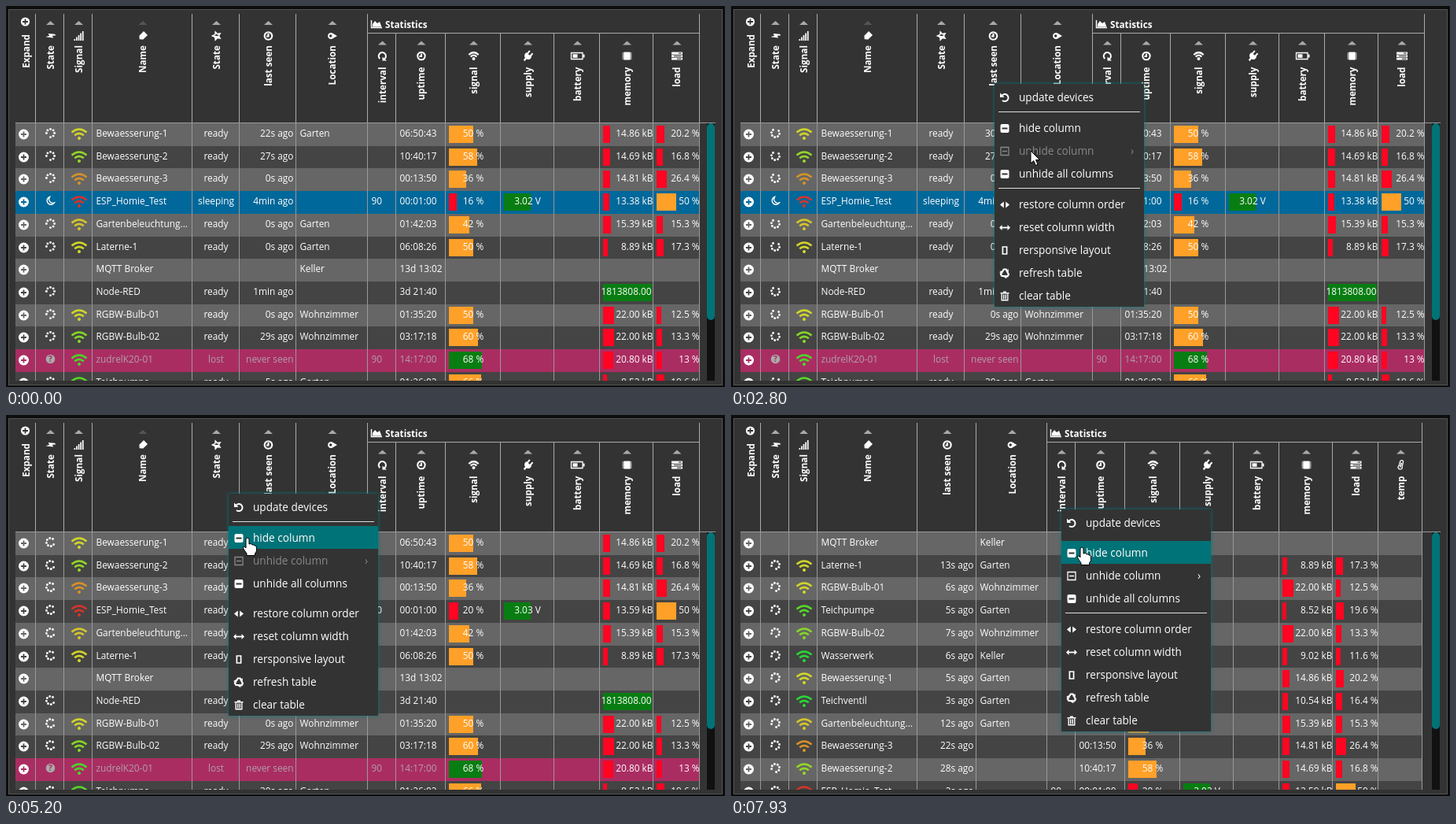
These frames come from a looping animation (914x484 px, 8000 ms). An HTML page:

```html
<!DOCTYPE html>
<html lang="de">
<head>
<meta charset="utf-8">
<title>Device table</title>
<style>
html, body { margin: 0; width: 100%; height: 100%; overflow: hidden; background: #0d0d0d; }
svg { display: block; width: 914px; height: 484px; font: 500 11.85px "Open Sans", "Noto Sans", sans-serif; fill: #fff; }
.head { font-size: 11.7px; font-weight: 700; }
.menu { font-size: 13.6px; font-weight: 400; }
.line { fill: none; stroke: currentColor; color: #fff; }
.glow { filter: drop-shadow(0 0 2px #00777c); }
</style>
</head>
<body>
<svg viewBox="0 0 914 484">
  <defs><clipPath id="body"><rect x="12" y="148" width="871" height="328"/></clipPath></defs>
  <rect x="3.5" y="4.5" width="907" height="477" fill="#333" stroke="#555"/>
  <g id="table"></g>
  <rect x="891" y="149" width="10" height="327" fill="#111"/>
  <rect x="891" y="149" width="10" height="250" rx="5" fill="#007377"/>
  <g id="menu"></g>
  <g id="cursor" stroke="#000" stroke-width="1"></g>
</svg>
<script>
const LOOP = 8000, STEP = 200 / 3;
const TOP = 149, ROW = 28.7;
const UPDATE = 470, WAKE = 3070, HIDE = 5330, REFRESH = 6500;
const $ = id => document.getElementById(id);

// Drawing helpers
const rect = (x, y, w, h, fill, more = '') =>
  `<rect x="${x}" y="${y}" width="${w}" height="${h}" fill="${fill}" ${more}/>`;
const text = (x, y, s, more = '') => `<text x="${x}" y="${y}" ${more}>${s}</text>`;
const solid = d => `<path d="${d}"/>`;
const line = (d, w = 1.5) => `<path class="line" stroke-width="${w}" d="${d}"/>`;
const disc = (x, y, r) => `<circle cx="${x}" cy="${y}" r="${r}"/>`;
const place = (x, y, s) => `<g transform="translate(${x} ${y})">${s}</g>`;
const turn = (deg, s) => `<g transform="rotate(${deg})">${s}</g>`;
const anchor = a => `text-anchor="${a}"`;

const plus = (r, bg) => disc(0, 0, r) +
  `<path d="M-3.5 0H3.5M0-3.5V3.5" stroke="${bg}" stroke-width="1.8"/>`;
const clock = line('M0-4.8A4.8 4.8 0 1 1-.1-4.8M0-3V.5H-2.5', 2.1);
const fan = line('M-6.2-1.5Q0-7.5 6.2-1.5M-3.8 1Q0-3 3.8 1', 2.2) + disc(0, 3.5, 2);
const box = rect(-5.5, -5.5, 11, 11, '#fff', 'rx="2"') + rect(-3.5, -1, 7, 2, '#333');
const icons = {
  bolt: turn(60, solid('M1-6L-4 1H-1L-2 6L4-2H1L3-6Z')),
  bars: [0, 1, 2, 3, 4].map(i => rect(-6 + i * 2.6, 4 - i * 2.5, 1.7, 2 + i * 2.5, '#fff')).join(''),
  tag: turn(-45, solid('M-6 0L-3-3.5H5V3.5H-3Z')),
  star: turn(-90, line('M0-5L1.5-1.7L5-1.3L2.4 1L3 4.6L0 2.8L-3 4.6L-2.4 1L-5-1.3L-1.5-1.7Z', 1.5) +
    solid('M0-5L-1.5-1.7L-5-1.3L-2.4 1L-3 4.6L0 2.8Z')),
  pin: turn(-90, `<path fill-rule="evenodd" d="M0 6L-3.5 0A4 4 0 1 1 3.5 0ZM0-4A1.7 1.7 0 1 0 .1-4Z"/>`),
  clock, fan,
  cycle: turn(90, line('M3.5 3.2A4.6 4.6 0 1 1 4-2.2', 2) + solid('M6-5.5V0H1Z')),
  plug: turn(40, solid('M-4.5-2H4.5V1Q3.5 4 1.2 4V7.5H-1.2V4Q-3.5 4-4.5 1ZM-3.4-6.5H-1.4V-2H-3.4ZM1.4-6.5H3.4V-2H1.4Z')),
  battery: line('M-8-4H6.5V4H-8Z', 1.3) + solid('M-6-2.3H0V2.3H-6ZM7-2H9V2H7Z'),
  chip: rect(-4, -5, 8, 10, '#fff') + line('M-6-3.5H6M-6-1.2H6M-6 1.2H6M-6 3.5H6', 1.2),
  server: solid('M-7-5H7V-2H-7ZM-7-1.3H7V1.5H-7ZM-7 2.2H7V5H-7Z') +
    `<path d="M2-3.5H5.5M-4 .1H5.5M0 3.6H5.5" stroke="#333"/>`,
  temp: turn(15, line('M-2 1V-4Q-2-6 0-6T2-4V1Q4 5 0 5.5Q-4 5-2 1Z', 1.3) + line('M0-3V3', 1.6)),
  undo: line('M-3.5-2.7A4.5 4.5 0 1 1-3 3.4', 2) + solid('M-6-6V-.5H-.5Z'),
  box,
  frame: line('M-5-5H5V5H-5ZM-3 0H3', 1.3),
  carets: solid('M-1.2-4V4L-6 0ZM1.2-4V4L6 0Z'),
  arrows: line('M-6 0H6', 1.8) + solid('M-7 0L-3.5-3.5V3.5ZM7 0L3.5-3.5V3.5Z'),
  phone: line('M-2.6-4.5H2.6V4.5H-2.6Z', 1.7),
  recycle: [0, 120, 240].map(a => turn(a, line('M-3.4-1.5L-1.2-5H1.6L3-2.5', 2.2) + solid('M1-2H5L4.5-5.5Z'))).join(''),
  trash: solid('M-5.5-4.5H-2V-6H2V-4.5H5.5V-3H-5.5Z') + line('M-3.8-3V5.3H3.8V-3M-1.3-2V4M1.3-2V4', 1.4)
};

// id, label, width, icon
const COLS = [
  ['expand', 'Expand', 26], ['state', 'State', 36, 'bolt'], ['wifi', 'Signal', 36, 'bars'],
  ['name', 'Name', 127, 'tag'], ['status', 'State', 60, 'star'], ['seen', 'last seen', 72, 'clock'],
  ['place', 'Location', 91, 'pin'], ['interval', 'interval', 36, 'cycle'], ['uptime', 'uptime', 63, 'clock'],
  ['signal', 'signal', 70, 'fan'], ['supply', 'supply', 68, 'plug'], ['battery', 'battery', 58, 'battery'],
  ['memory', 'memory', 68, 'chip'], ['load', 'load', 59, 'server'], ['temp', 'temp', 56, 'temp']
];
const STATS = 'interval';

function layout(hidden) {
  const widths = hidden ? { seen: 75, place: 90, load: 58 } : {};
  let x = 12, stats = false;
  return COLS.filter(c => c[0] !== (hidden ? 'status' : 'temp')).map(([id, label, w, icon]) => {
    w = widths[id] || w;
    stats = stats || id === STATS;
    const col = { id, label, w, icon, x, stats, mid: x + w / 2, edge: x + w - 1 };
    x += w;
    return col;
  });
}

// name | status | last seen per update | location | interval | uptime | signal | supply | memory | load
const DEVICES = `Bewaesserung-1|ready|22s,30s,5s|Garten||06:50:43|50||14.86|20.2
Bewaesserung-2|ready|27s,27s,28s|||10:40:17|58||14.69|16.8
Bewaesserung-3|ready|0s,0s,22s|||00:13:50|36||14.81|26.4
ESP_Homie_Test|sleeping|4min,4min,2s||90|00:01:00|16|3.02|13.38|50
Gartenbeleuchtung...|ready|0s,0s,12s|Garten||01:42:03|42||15.39|15.3
Laterne-1|ready|0s,0s,13s|Garten||06:08:26|50||8.89|17.3
MQTT Broker|||Keller||13d 13:02||||
Node-RED|ready|1min,1min,1min|||3d 21:40|||1813808.00|
RGBW-Bulb-01|ready|0s,0s,6s|Wohnzimmer||01:35:20|50||22.00|12.5
RGBW-Bulb-02|ready|29s,29s,7s|Wohnzimmer||03:17:18|60||22.00|13.3
zudrelK20-01|lost|never seen||90|14:17:00|68||20.80|13
Teichpumpe|ready|5s,30s,5s|Garten||01:26:02|66||8.52|19.6
Wasserwerk|ready|29s,29s,6s|Keller||08:44:00|74||9.02|11.6
Teichventil|ready|30s,30s,3s|Garten||00:05:00|74||10.54|16.4`.split('\n').map(row => {
  const [name, status, seen, place, interval, uptime, signal, supply, memory, load] = row.split('|');
  return { name, status, seen: seen.split(','), place, interval, uptime, signal, supply, memory, load };
});
const BY_NAME = [...Array(12).keys()];
const UNSORTED = [6, 5, 8, 11, 9, 12, 0, 13, 4, 2, 1, 3];
const AWAKE = { status: 'ready', seen: ['0s', '0s', '2s'], signal: '20', supply: '3.03', memory: '13.59' };

const ORANGE = '#ffa028', RED = '#ff0522', GREEN = '#087d12';
const level = p => p >= 67 ? GREEN : p > 30 ? ORANGE : RED;
const hue = p => p < 40 ? Math.max(4, 2 * p - 36) : Math.max(54, 2.6 * p - 68);

function wifi(p) {
  const c = `hsl(${hue(p)} 68% 50%)`;
  return `<g fill="${c}" stroke="${c}">` + disc(0, 0, 1.6) +
    `<path fill="none" stroke-width="2.6" d="M-9.5-7.5Q0-15.5 9.5-7.5M-5.8-3.7Q0-8.7 5.8-3.7"/></g>`;
}

// Seven dots, one gap
const spinner = [0, 1, 2, 3, 4, 5, 6].map(i => {
  const a = i * Math.PI / 4;
  return disc((5.1 * Math.cos(a)).toFixed(2), (5.1 * Math.sin(a)).toFixed(2), 1.45);
}).join('');

function stateIcon(d, bg) {
  if (d.status === 'ready') return `<g class="spin">${spinner}</g>`;
  if (d.status === 'sleeping') return line('M-1-5A5 5 0 1 0 4.8 2.5A5 5 0 0 1-1-5Z', 1.4);
  if (d.status === 'lost') return `<circle r="5.8" fill="#aaa"/>` +
    text(0, 3.6, '?', `${anchor('middle')} font-size="10" font-weight="700" fill="${bg}"`);
  return '';
}

function cell(d, c, y, bg, phase) {
  const base = y + 17, v = d[c.id];
  const bar = (w, fill) => rect(c.x + 4, y + 3, Math.round(w), 22, fill);
  const left = s => text(c.x + 4.5, base, s);
  const mid = s => text(c.mid, base, s, anchor('middle'));
  const right = (s, gap) => text(c.x + c.w - gap, base, s, anchor('end'));
  switch (c.id) {
    case 'expand': return place(22.5, y + 14, plus(6.5, bg));
    case 'state': return place(56.5, y + 12.5, stateIcon(d, bg));
    case 'wifi': return d.signal ? place(93, y + 19, wifi(+d.signal)) : '';
    case 'status': return mid(v);
    case 'seen': {
      const s = v[Math.min(phase, v.length - 1)];
      return s ? right(/\d/.test(s) ? s + ' ago' : s, 3.5) : '';
    }
    case 'signal': return v ? bar(v * .62, level(v)) + mid(v + ' %') : '';
    case 'supply': return v ? bar(34, GREEN) + mid(v + ' V') : '';
    case 'memory':
      if (!v) return '';
      return v > 100 ? bar(62, GREEN) + text(c.x + 1.5, base, v) : bar(v * .63, RED) + right(v + ' kB', .5);
    case 'load': return v ? bar(v * .5, v >= 50 ? ORANGE : RED) + right(v + ' %', .5) : '';
    default: return v ? left(v) : '';
  }
}

function header(cols, hover, sorted) {
  const last = cols.at(-1), start = cols.find(c => c.stats).x;
  let s = '';
  for (const c of cols) {
    const top = c.stats ? 35 : 10, x = c.mid + .5, dy = c.stats ? 25.5 : 0;
    if (c.id === hover) s += rect(c.x, top, c.w, 148 - top, '#191919');
    if (c.icon) {
      s += `<path fill="${c.id === 'name' && sorted ? '#555' : '#aaa'}" d="M${x - 5.5} ${24 + dy}h11l-5.5-5z"/>`;
      s += place(x, 38 + dy, icons[c.icon]);
    } else s += place(24.5, 20, plus(5.6, '#333'));
    const y = c.icon ? 50 + dy + (c.stats ? 2 : 0) : 36;
    s += text(0, 0, c.label, `class="head" ${anchor('end')} transform="translate(${x + 4} ${y}) rotate(-90)"`);
    const from = c === last ? 10 : top;
    s += rect(c.edge, from, 1, 148 - from, '#aaa');
  }
  return s + rect(start, 34, last.edge - start, 1, '#aaa') + rect(12, 148, 890, 1, '#999') +
    place(start + 11, 23, line('M-6.5-5V4.5H7', 1.5) + solid('M-5 3.5V0L-2-4L1-1L4-3L6.5 3.5Z')) +
    text(start + 22, 27.5, 'Statistics', 'class="head"');
}

function table(t, hover) {
  const hidden = t >= HIDE, cols = layout(hidden);
  const end = cols.at(-1).edge + 1;
  const phase = t < UPDATE ? 0 : t < REFRESH ? 1 : 2;
  let s = '';
  (hidden ? UNSORTED : BY_NAME).forEach((n, i) => {
    let d = DEVICES[n];
    if (d.status === 'sleeping' && t >= WAKE) d = { ...d, ...AWAKE };
    const y = Math.round(TOP + i * ROW), h = Math.round(TOP + (i + 1) * ROW) - y;
    const bg = d.status === 'sleeping' ? '#00689a' : d.status === 'lost' ? '#aa2d62' : i % 2 ? '#444' : '#666';
    s += rect(12, y, end - 12, h, bg);
    for (const c of cols) {
      const dim = d.status === 'lost' && !['expand', 'signal', 'memory', 'load'].includes(c.id);
      s += `<g fill="${dim ? '#b0a0a8' : '#fff'}">${cell(d, c, y, bg, phase)}</g>`;
    }
  });
  for (const c of cols) s += rect(c.edge, TOP, 1, 327, '#999');
  return `<g clip-path="url(#body)">${s}</g>` + header(cols, hover, !hidden);
}

// Context menu: label, icon, centre below the menu top, dividers above
const ITEMS = [
  ['update devices', 'undo', 17.5, 0], ['hide column', 'box', 56.5, 1], ['unhide column', 'frame', 85.5, 1],
  ['unhide all columns', 'box', 114.5, 1], ['restore column order', 'carets', 153.5, 2],
  ['reset column width', 'arrows', 182.5, 2], ['rersponsive layout', 'phone', 211.5, 2],
  ['refresh table', 'recycle', 240.5, 2], ['clear table', 'trash', 269.5, 2]
];
const MENUS = [
  { from: 1730, to: 3930, x: 335, y: 99, lost: 0 },
  { from: 3930, to: HIDE, x: 283, y: 100, lost: 2 },
  { from: 7200, to: LOOP, x: 420, y: 120, lost: 1, unhide: true }
];
const inside = (m, p) => m && p.x > m.x && p.x < m.x + 190 && p.y > m.y && p.y < m.y + 282;
const itemY = (m, [, , y, above]) => m.y + y - (m.lost && above >= m.lost ? 1 : 0);
const over = (m, p, y) => inside(m, p) && p.y >= y - 15.5 && p.y < y + 13.5;

function menu(m, p) {
  if (!m) return '';
  let s = rect(m.x, m.y, 190, m.lost ? 282 : 283, '#333', 'class="glow"');
  for (const item of ITEMS) {
    const [label, icon] = item, y = itemY(m, item);
    const off = icon === 'frame' && !m.unhide, color = off ? '#888' : '#fff';
    if (!off && over(m, p, y)) s += rect(m.x, y - 15.5, 190, 29, '#007378');
    s += place(m.x + 13, y, icons[icon].replace('class="line"', `class="line" style="color:${color}"`));
    s += text(m.x + 31, y + 4.5, label, `class="menu" fill="${color}"`);
    if (icon === 'frame') s += text(m.x + 173, y + 4.5, '›', `class="menu" fill="${color}"`);
  }
  if (m.lost !== 1) s += rect(m.x + 5, m.y + 35, 180, 1, '#ddd');
  if (m.lost !== 2) s += rect(m.x + 5, m.y + 132 - m.lost, 180, 1, '#ddd');
  return s;
}

// Pointer stops: time, x, y
const PATH = [
  [200, 420, 500], [800, 335, 99], [1930, 335, 99], [2530, 381, 184], [3500, 381, 184], [3870, 283, 100],
  [4130, 283, 100], [4400, 307, 156], [5270, 307, 156], [5600, 322, 165], [6130, 322, 165],
  [6600, 420, 121], [7470, 420, 121], [7930, 446, 168]
];
const HAND = 'M-2 2Q-2 0 0 0T2 2V8Q5 6.5 6 9Q8.5 8 9 10Q11.5 9.5 11.5 12V16Q11.5 18 9.5 20V22.5H-1V20Q-4 16-5.5 13Q-6.5 10.5-4 11L-2 13Z';
const ARROW = 'M0 0V16L3.7 12.6L6.4 18.5L9 17.3L6.5 11.5H11.5Z';

function pointer(t) {
  const i = PATH.findIndex(k => k[0] > t);
  if (i < 1) { const [, x, y] = i ? PATH.at(-1) : PATH[0]; return { x, y }; }
  const [t0, x0, y0] = PATH[i - 1], [t1, x1, y1] = PATH[i];
  const u = (t - t0) / (t1 - t0), e = u * u * (3 - 2 * u);
  return { x: x0 + (x1 - x0) * e, y: y0 + (y1 - y0) * e };
}

function hovered(t, p, m) {
  if (inside(m, p) || p.y >= TOP) return '';
  const c = layout(t >= HIDE).find(c => p.x >= c.x && p.x < c.x + c.w);
  return c && p.y > (c.stats ? 35 : 10) ? c.id : '';
}

let lastKey = '', spins = [];
function render(now) {
  const t = Math.floor((now % LOOP + 5) / STEP) * STEP;
  const p = pointer(t), m = MENUS.find(m => t >= m.from - 5 && t < m.to - 5);
  const hover = hovered(t, p, m);
  const key = [t >= UPDATE, t >= WAKE, t >= HIDE, t >= REFRESH, hover].join();
  if (key !== lastKey) {
    $('table').innerHTML = table(t, hover);
    spins = document.querySelectorAll('.spin');
    lastKey = key;
  }
  spins.forEach(s => s.setAttribute('transform', `rotate(${180 + t * .18})`));
  $('menu').innerHTML = menu(m, p);
  const off = m && !m.unhide && over(m, p, itemY(m, ITEMS[2]));
  $('cursor').innerHTML = place(p.x, p.y, solid(off ? ARROW : HAND));
}

const start = performance.now();
function tick() {
  render(performance.now() - start);
  requestAnimationFrame(tick);
}
tick();
</script>
</body>
</html>
```
